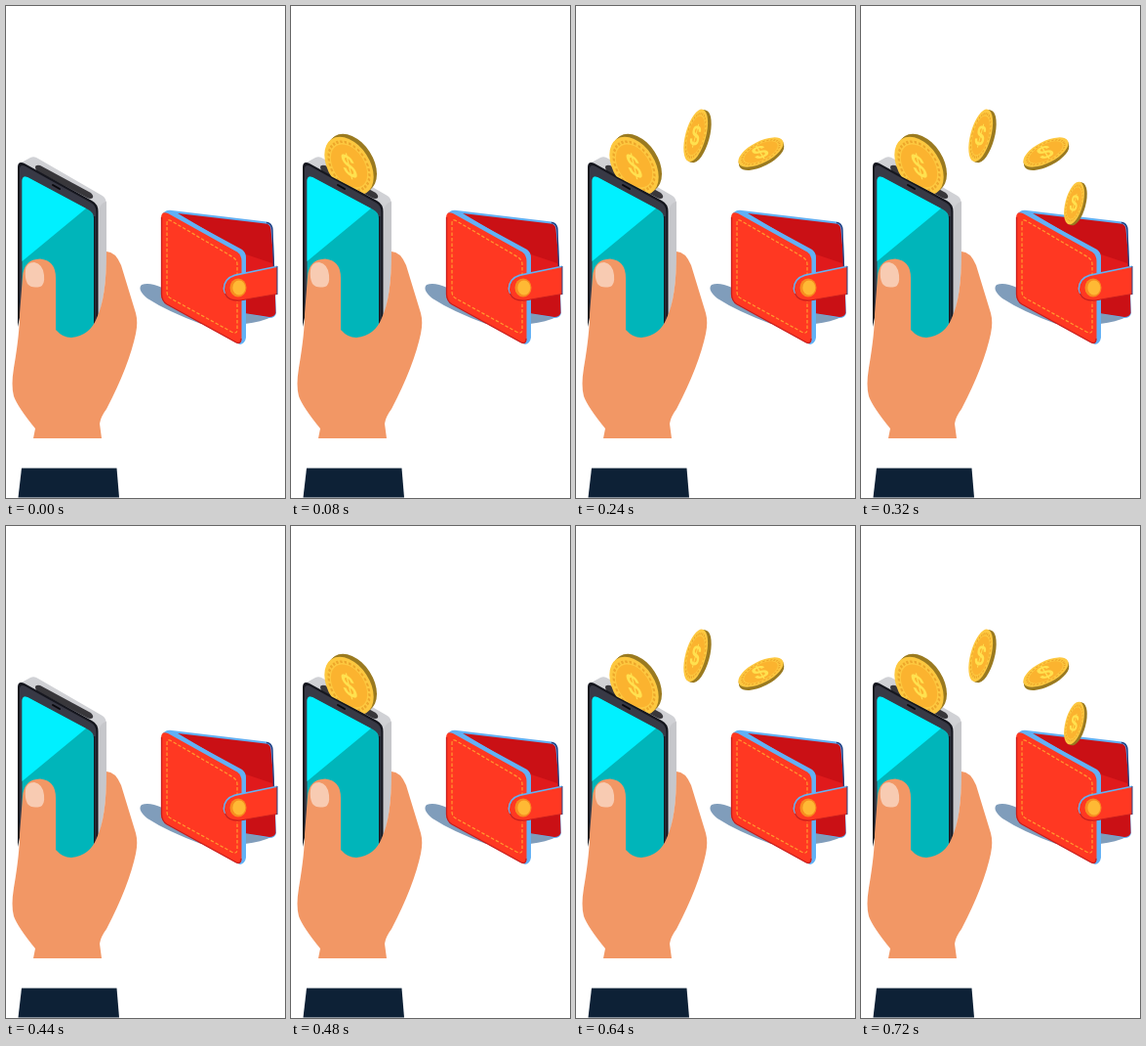
Recreate the animation shown at these times as an HTML page. Size 286 px wide and 503 px high, loop 0.84 s.

```html
<!DOCTYPE html>
<html lang="en">
<head>
<meta charset="utf-8">
<title>Phone to wallet</title>
<style>
  html, body { margin: 0; width: 100%; height: 100%; overflow: hidden; background: #fff; }
  svg { display: block; width: 100vw; height: 100vh; }
  text { font: bold 32px "Liberation Sans", Arial, sans-serif; text-anchor: middle; fill: #ffe14f; }
  .coin { opacity: 0; animation: 840ms step-end infinite; }
  .c1 { animation-name: c1; }
  .c2 { animation-name: c2; }
  .c3 { animation-name: c3; }
  .c4 { animation-name: c4; }
  /* coins add up one by one, clear at 440 ms, then add up again */
  @keyframes c1 { 0%, 52.381% { opacity: 0 } 9.5238%, 57.1429% { opacity: 1 } 100% { opacity: 0 } }
  @keyframes c2 { 0%, 52.381% { opacity: 0 } 19.0476%, 66.6667% { opacity: 1 } 100% { opacity: 0 } }
  @keyframes c3 { 0%, 52.381% { opacity: 0 } 28.5714%, 76.1905% { opacity: 1 } 100% { opacity: 0 } }
  @keyframes c4 { 0%, 52.381% { opacity: 0 } 38.0952%, 85.7143% { opacity: 1 } 100% { opacity: 0 } }
</style>
</head>
<body>
<svg viewBox="0 0 286 503" preserveAspectRatio="none">
  <defs>
    <circle id="rim" r="20" fill="#9a7a20"/>
    <g id="face">
      <circle r="20" fill="#fdc840"/>
      <circle r="16.6" fill="none" stroke="#eda62a" stroke-width="1.8" stroke-dasharray="2 1.6"/>
      <circle r="14.8" fill="#fbb32f"/>
    </g>
    <clipPath id="slot"><path d="M20 100H110V200L84 196.500L36 171.500H20Z"/></clipPath>
  </defs>

  <g id="phone">
    <path d="M14 161L25 155Q29 153 33 156L98 193.500Q103 196 103 203V260Q102 300 93 322L60 300Z" fill="#d0d1d5"/>
    <path d="M96 206Q98 201 103 200V260Q102 295 94 318Z" fill="#c6c7cb"/>
    <path d="M30 165Q30 162 35 163L86 190.500Q90 193 89 196Q87 198 83 196L32 169Q30 167 30 165Z" fill="#38373b"/>
    <path d="M12 328V165Q12 158 19 161L88 199Q94.500 202.500 94.500 210V325H60V300H18Z" fill="#15161e"/>
    <path d="M14 328V167Q14 161 20 164L87 201Q92.500 204 92.500 211V325H60V300H18Z" fill="#383945"/>
    <path d="M48 183L55 187" stroke="#08080c" stroke-width="2" stroke-linecap="round"/>
    <path d="M16.500 290V179Q16.500 173 22 175L84 208Q90 211 90 217V345H40Z" fill="#00b5ba"/>
    <path d="M16.500 261V179Q16.500 173 22 175L82 207Z" fill="#00f0ff"/>
    <path d="M90.700 215V325" stroke="#15161e" stroke-width="1.400"/>
  </g>

  <g id="hand">
    <path d="M17 277Q18 259 35 258.500Q51 260 51 278V331Q58 339 67 339Q86 337 93 319Q103 298 103 251Q112 251 118 265L133 314Q135.500 323 133 335Q126 368 103 412Q97 420 96 427L98 442H28L30 432Q12 410 8 399Q5 388 8 370Q14 335 14 315Z" fill="#f29765"/>
    <path d="M20 270Q21 262 29 262Q38 264 39 275Q40 285 35 287Q26 289 22 284Q19 278 20 270Z" fill="#f8cbb2"/>
    <path d="M16 472.500H113.500L116 502.500H12.500Z" fill="#0d2136"/>
  </g>

  <g id="wallet">
    <path d="M160 288Q147 282 139 285Q134 290 145 299Q165 312 200 325L245 325Q262 323 272 318L240 300Z" fill="#809dbb"/>
    <path d="M160 214Q163 208 170 209L267 220.500Q273 221 273.500 228L277 314Q276 319 270 319L244 314Z" fill="#62b1f5"/>
    <path d="M176 212L266 222.500Q271 223 271.500 228L275 266L276.500 314Q275 318 270 318L244 314V252Z" fill="#ca1015"/>
    <path d="M246 254L273 263L274 270L246 276Z" fill="#e01a1c"/>
    <path d="M267 221.500Q272.500 222 273 229L274.500 266" fill="none" stroke="#263c7c" stroke-width="1.3"/>
    <path d="M161 212Q164 208 170 210L242 249Q246 252 246 257V339Q245 345 240 346L236 344V258Z" fill="#62b1f5"/>
    <path d="M159 217Q159 209 166 212L237 251.500Q241.500 254.500 241.500 261V340Q241 346 236 344L165 305Q159 301 159 295Z" fill="#ff3822"/>
    <path d="M159.500 216V295Q160 302 165 305L236 344Q241 346 241 340" fill="none" stroke="#c81c1c" stroke-width="1.3"/>
    <path d="M237 276V264Q237 260 233 257L170 220Q165 217 165 222V292Q165 297 169 299L231 333Q237 336 237 331V302" fill="none" stroke="#ff9a2e" stroke-width="1.2" stroke-dasharray="3.500 2"/>
    <path d="M222.500 289Q223 278 234 274.500L278 265.500V269L238 301Q225 302 222.500 289Z" fill="#62b1f5"/>
    <path d="M224 290Q224 279 235 276L278 267V294.500L240 301Q226 303 224 290Z" fill="#ff3822"/>
    <path d="M278 294.500L240 301Q228 302 224.500 294" fill="none" stroke="#c81c1c" stroke-width="1.2"/>
    <path d="M278 266V295" stroke="#263c7c"/>
    <ellipse cx="238" cy="288" rx="8.500" ry="9.500" fill="#f78c20"/>
    <ellipse cx="238.800" cy="288" rx="6.500" ry="7.500" fill="#ffb934"/>
  </g>

  <g class="coin c1" clip-path="url(#slot)">
    <use href="#rim" transform="translate(62.800 160.500) rotate(57) scale(1.64 1.06)"/>
    <use href="#rim" transform="translate(61.200 162) rotate(57) scale(1.64 1.06)"/>
    <use href="#face" transform="translate(59.500 163.500) rotate(57) scale(1.64 1.06)"/>
    <text y="11" transform="matrix(.82 .4 .24 1.03 59.500 163.500)">$</text>
  </g>
  <g class="coin c2">
    <use href="#rim" transform="translate(126.300 133.400) rotate(15) scale(.525 1.38)"/>
    <use href="#rim" transform="translate(124.500 133) rotate(15) scale(.525 1.38)"/>
    <use href="#face" transform="translate(122.700 132.400) rotate(15) scale(.525 1.38)"/>
    <text y="11" transform="translate(122.700 132.400) rotate(15) scale(.54 .95)">$</text>
  </g>
  <g class="coin c3">
    <use href="#rim" transform="translate(190.200 152.800) rotate(-27) scale(1.27 .55)"/>
    <use href="#rim" transform="translate(189.800 151) rotate(-27) scale(1.27 .55)"/>
    <use href="#face" transform="translate(189.500 149.500) rotate(-27) scale(1.27 .55)"/>
    <text y="11" transform="matrix(.8 -.32 .32 .5 188.500 149.500)">$</text>
  </g>
  <g class="coin c4">
    <use href="#rim" transform="translate(221.300 202.500) rotate(15) scale(.45 1.12)"/>
    <use href="#rim" transform="translate(220 202) rotate(15) scale(.45 1.12)"/>
    <use href="#face" transform="translate(218.500 201.500) rotate(15) scale(.45 1.12)"/>
    <text y="11" transform="translate(218.500 201.500) rotate(15) scale(.45 .78)">$</text>
  </g>
</svg>
</body>
</html>
```
